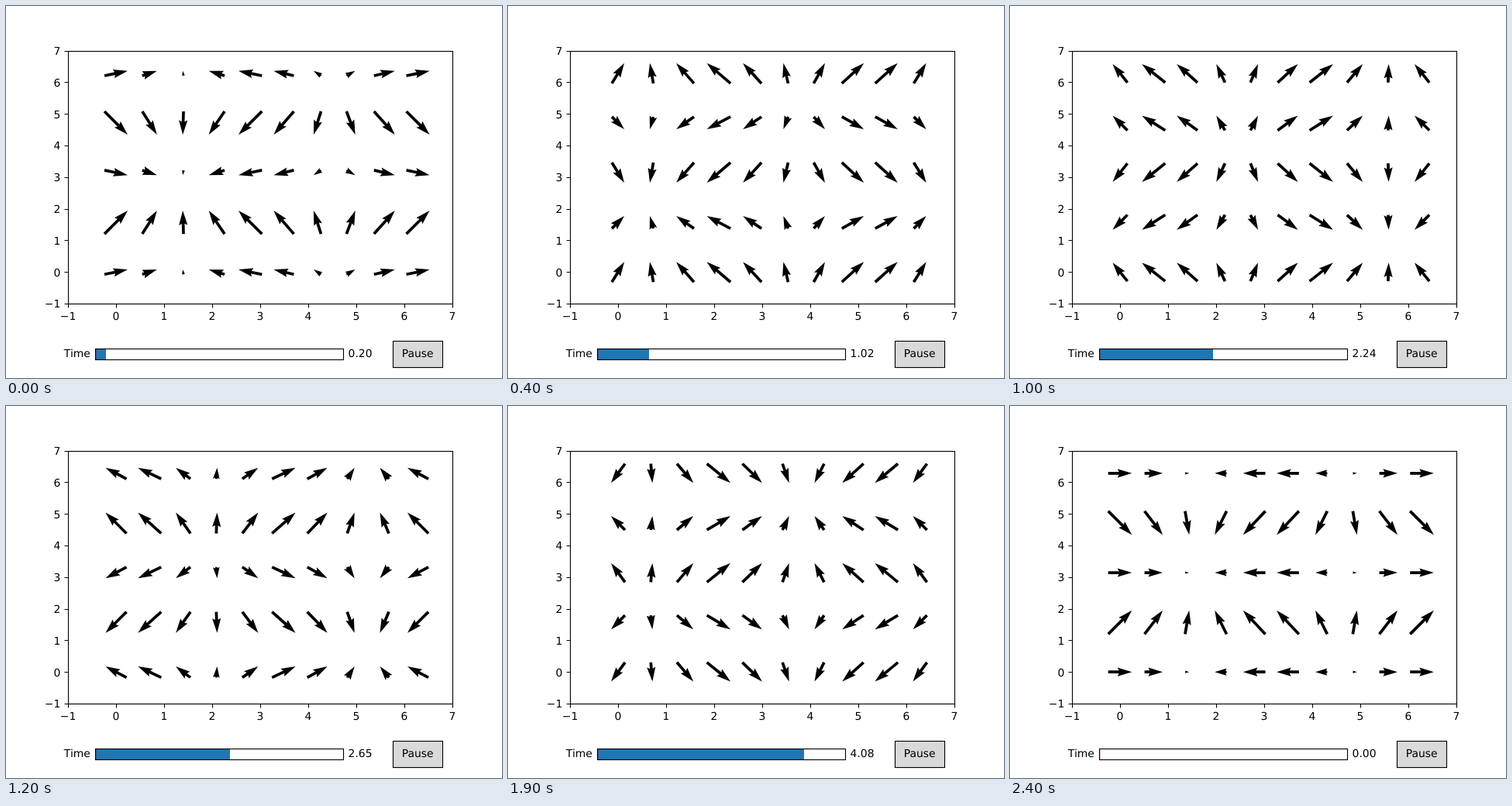
An HTML page that plays this animation: 640 by 480 pixels, repeating every 2500 ms.

```html
<!DOCTYPE html>
<html lang="en">
<head>
<meta charset="utf-8">
<title>Vector field</title>
<style>
html, body { margin: 0; width: 100%; height: 100%; overflow: hidden; background: #fff; }
svg { display: block; }
text { font: 13.889px "DejaVu Sans", sans-serif; text-rendering: geometricPrecision; }
.line { fill: none; stroke: #000; stroke-width: 1.11; }
.mid { text-anchor: middle; }
.end { text-anchor: end; }
</style>
</head>
<body>
<svg width="640" height="480" viewBox="0 0 640 480">
  <path id="arrows"/>
  <path id="ticks" class="line"/>
  <rect class="line" x="80.5" y="58.5" width="496" height="326"/>
  <g id="labels"></g>

  <text class="end" x="108.8" y="453">Time</text>
  <rect id="bar" x="115" y="442" height="14" fill="#1f77b4"/>
  <rect x="115" y="442" width="1.19" height="14" fill="red"/>
  <rect class="line" x="115.5" y="442.5" width="320" height="14"/>
  <text id="value" x="441.6" y="453"></text>

  <rect x="499" y="432" width="64" height="34" fill="#d9d9d9"/>
  <rect class="line" x="499.5" y="432.5" width="64" height="34"/>
  <text class="mid" x="531.2" y="453">Pause</text>
</svg>
<script>
const $ = id => document.getElementById(id);
const COLS = 10, ROWS = 5, STEPS = 25, STEP_MS = 100, DT = 10 / 49;
const UNIT = 30.62;   // pixels for a vector of length 1
const SHAFT = 3.72;   // shaft width; arrow shapes are measured in shafts
const px = x => 142 + 62 * x;
const py = y => 343.2 - 40.8 * y;

function drawAxes() {
  let ticks = '', labels = '';
  for (let n = -1; n <= 7; n++) {
    const name = String(n).replace('-', '\u2212');
    const y = Math.round(py(n));
    ticks += `M${px(n) + .5} 384.5v5M80.5 ${y + .5}h-5`;
    labels += `<text class="mid" x="${px(n)}" y="405">${name}</text>` +
              `<text class="end" x="70.3" y="${Math.round(py(n) + 5.3)}">${name}</text>`;
  }
  $('ticks').setAttribute('d', ticks);
  $('labels').innerHTML = labels;
}

// Outline of an arrow centred on the origin and pointing right.
function outline(length) {
  if (length < 1) {
    return Array.from({length: 6}, (_, i) =>
      [Math.cos(i * Math.PI / 3) / 2, Math.sin(i * Math.PI / 3) / 2]);
  }
  const scale = Math.min(1, length / 5);
  const tip = Math.max(5, length) / 2;
  return [[-tip, .5], [tip - 4.5, .5], [tip - 5, 1.5], [tip, 0],
          [tip - 5, -1.5], [tip - 4.5, -.5], [-tip, -.5]]
    .map(([x, y]) => [x * scale, y * scale]);
}

function arrow(x, y, u, v) {
  const size = Math.hypot(u, v);
  const c = u / size * SHAFT, s = -v / size * SHAFT;
  const points = outline(size * UNIT / SHAFT).map(([a, b]) =>
    (px(x) + a * c - b * s).toFixed(2) + ' ' + (py(y) + a * s + b * c).toFixed(2));
  return 'M' + points.join('L') + 'Z';
}

let shown = -1;
function draw(ms) {
  const step = (Math.floor(ms / STEP_MS) + 1) % STEPS;
  if (step === shown) return;
  shown = step;
  const t = step * DT;
  let d = '';
  for (let row = 0; row < ROWS; row++) {
    for (let col = 0; col < COLS; col++) {
      const x = 2 * Math.PI * col / (COLS - 1);
      const y = 2 * Math.PI * row / (ROWS - 1);
      d += arrow(x, y, Math.cos(x + t), Math.sin(y + t));
    }
  }
  $('arrows').setAttribute('d', d);
  $('bar').setAttribute('width', Math.round(115.2 + 320 * step / (STEPS - 1)) - 115);
  $('value').textContent = t.toFixed(2);
}

function loop() {
  draw(performance.now() - start);
  requestAnimationFrame(loop);
}

drawAxes();
const start = performance.now();
loop();
</script>
</body>
</html>
```
